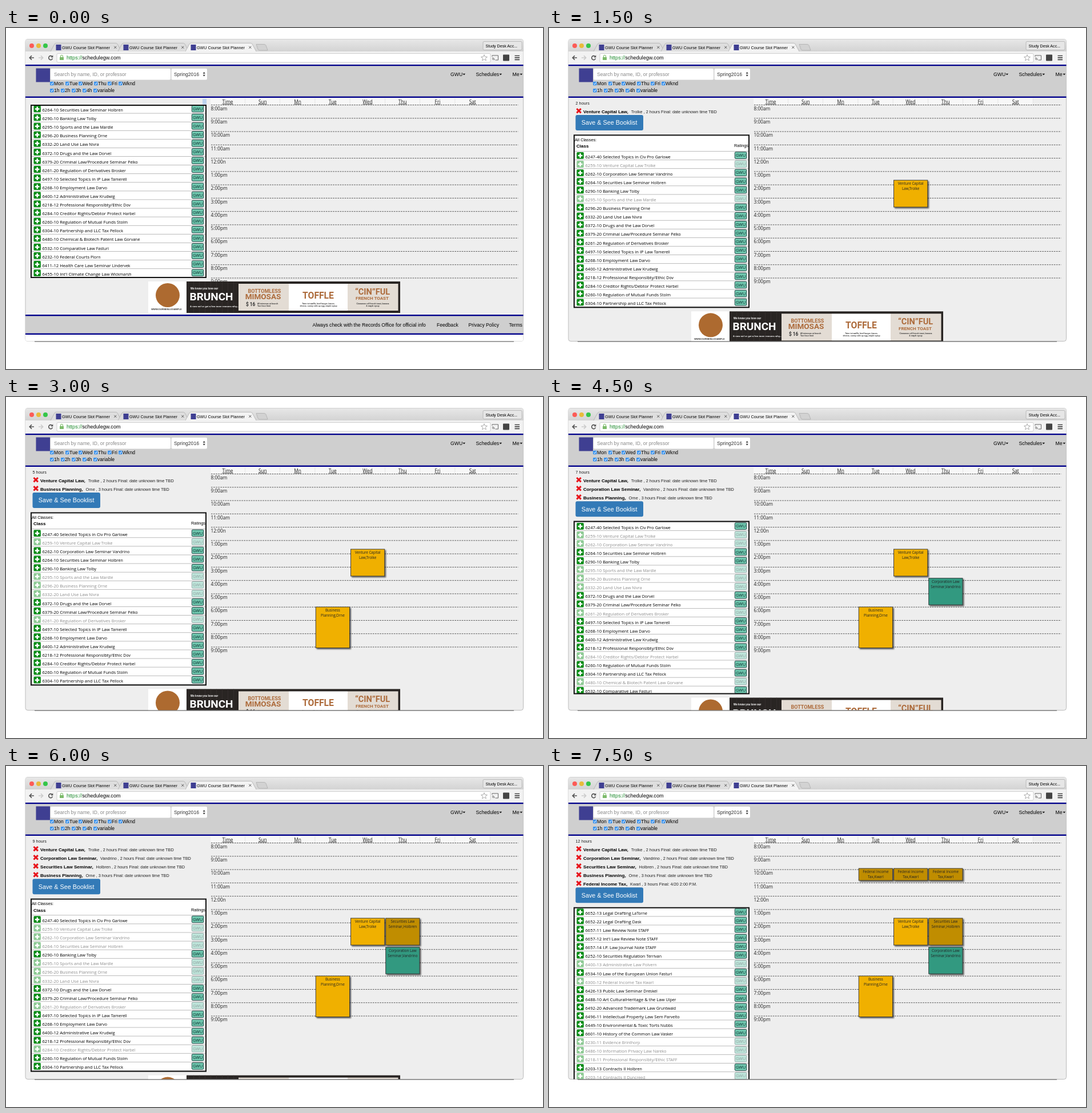
Write an HTML page that moves like this. It is 940 px wide and 596 px high and loops after 8 s.

```html
<!DOCTYPE html>
<html lang="en">
<head>
<meta charset="utf-8">
<title>Class planner</title>
<style>
html, body { margin: 0; width: 100%; height: 100%; overflow: hidden; background: #fff; }
svg { display: block; width: 940px; height: 596px; font-family: "Liberation Sans", Arial, sans-serif; }
.o { font-family: "Open Sans", "Noto Sans", sans-serif; }
.r { font-family: Roboto, sans-serif; font-weight: 700; }
text { white-space: pre; }
</style>
</head>
<body>
<svg id="stage" viewBox="0 0 940 596"></svg>
<script>
const PITCH = 15.09, NAVY = '#00008b';

const rect = (x, y, w, h, fill, more = '') =>
  `<rect x="${x}" y="${y}" width="${w}" height="${h}" fill="${fill}" ${more}/>`;
const text = (x, y, size, str, more = '') =>
  `<text x="${x}" y="${y}" font-size="${size}" ${more}>${str}</text>`;
const middle = (x, y, size, str, more = '') => text(x, y, size, str, `text-anchor="middle" ${more}`);
const path = (d, stroke, width = 1, more = '') =>
  `<path d="${d}" fill="none" stroke="${stroke}" stroke-width="${width}" ${more}/>`;
const shape = (d, fill) => `<path d="${d}" fill="${fill}"/>`;
const range = (n, draw) => Array.from({ length: n }, (_, i) => draw(i)).join('');
const parse = list => list.trim().split('\n').map(line => line.split('|'));

const classes = parse(`
6247-40 Selected Topics in Civ Pro|Garlowe
6259-10 Venture Capital Law|Trolke
6262-10 Corporation Law Seminar|Vandrino
6264-10 Securities Law Seminar|Holbren
6290-10 Banking Law|Tolby
6295-10 Sports and the Law|Mardle
6296-20 Business Planning|Orne
6332-20 Land Use Law|Nivra
6372-10 Drugs and the Law|Dorvel
6379-20 Criminal Law/Procedure Seminar|Pelko
6261-20 Regulation of Derivatives|Brosker
6497-10 Selected Topics in IP Law|Tamerell
6268-10 Employment Law|Darvo
6400-12 Administrative Law|Krudwig
6218-12 Professional Responslbty/Ethic|Dov
6284-10 Creditor Rights/Debtor Protect|Harbel
6260-10 Regulation of Mutual Funds|Stolm
6304-10 Partnership and LLC Tax|Pellock
6480-10 Chemical &amp; Biotech Patent Law|Gorvane
6532-10 Comparative Law|Fasturi
6232-10 Federal Courts|Plorn
6411-12 Health Care Law Seminar|Lindervek
6455-10 Int'l Climate Change Law|Wickmarsh`);

const laterClasses = parse(`
6652-13 Legal Drafting|LaTorne
6652-22 Legal Drafting|Dask
6657-11 Law Review Note|STAFF
6657-12 Int'l Law Review Note|STAFF
6657-14 I.P. Law Journal Note|STAFF
6252-10 Securities Regulation|Terrivan
6400-13 Administrative Law|Polvern
6534-10 Law of the European Union|Fasturi
6300-12 Federal Income Tax|Kwarl
6426-13 Public Law Seminar|Dreskel
6488-10 Art CulturalHeritage &amp; the Law|Ulper
6492-20 Advanced Trademark Law|Gruntwald
6496-11 Intellectual Property Law Sem|Parvelto
6449-10 Environmental &amp; Toxic Torts|Nubbs
6601-10 History of the Common Law|Vasker
6230-11 Evidence|Brinthorp
6486-10 Information Privacy Law|Nareko
6218-11 Professional Responslbty/Ethic|STAFF
6203-13 Contracts II|Holbren
6203-14 Contracts II|Duncreed`);

const TBD = 'date unknown time TBD';
// days: column numbers, Sunday = 0
const courses = {
  venture: { title: 'Venture Capital Law', who: 'Trolke', hours: 2, final: TBD,
    lines: ['Venture Capital', 'Law,Trolke'], days: [3], y: 266, h: 47, fill: '#f0b000' },
  corporation: { title: 'Corporation Law Seminar', who: 'Vandrino', hours: 2, final: TBD,
    lines: ['Corporation Law', 'Seminar,Vandrino'], days: [4], y: 316.7, h: 46.5, fill: '#339980' },
  securities: { title: 'Securities Law Seminar', who: 'Holbren', hours: 2, final: TBD,
    lines: ['Securities Law', 'Seminar,Holbren'], days: [4], y: 266, h: 47, fill: '#c08d00' },
  business: { title: 'Business Planning', who: 'Orne', hours: 3, final: TBD,
    lines: ['Business', 'Planning,Orne'], days: [2], y: 367, h: 71.5, fill: '#f0b000' },
  tax: { title: 'Federal Income Tax', who: 'Kwarl', hours: 3, final: '4/20 2:00 P.M.',
    lines: ['Federal Income', 'Tax,Kwarl'], days: [2, 3, 4], y: 179, h: 21, fill: '#c08d00' },
};

// top: list box, first: centre of the first row, off: rows that clash
const states = [
  { top: 134, first: 96.2, off: [], chosen: [] },
  { top: 186.3, first: 223, off: [1, 5], chosen: ['venture'] },
  { top: 201.4, first: 238.2, off: [1, 5, 6, 7, 10], chosen: ['venture', 'business'] },
  { top: 216.5, first: 226, off: [1, 2, 5, 6, 7, 10, 15, 18], chosen: ['venture', 'corporation', 'business'] },
  { top: 231.6, first: 268.3, off: [1, 2, 3, 5, 6, 7, 10, 15],
    chosen: ['venture', 'corporation', 'securities', 'business'] },
  { top: 246.7, first: 255.3, off: [6, 8, 15, 16, 17, 19], rows: laterClasses,
    chosen: ['venture', 'corporation', 'securities', 'business', 'tax'] },
];

function tab(i) {
  const x = 81 + i * 118, active = i === 2;
  return `<path d="M${x - 3} 41 L${x + 4} 28 Q${x + 5} 26.5 ${x + 7} 26.5 H${x + 111} Q${x + 113} 26.5 ${x + 114} 28 L${x + 121} 41"
    fill="${active ? '#f3f3f3' : '#dedede'}" stroke="#aaa" stroke-width=".7"/>` +
    rect(x + 6.5, 29, 9, 10, '#3f3f92') +
    text(x + 17, 36.8, 7.2, 'GWU Course Slot Planner') +
    path(`M${x + 108.3} 31.8 l4 4 m0 -4 l-4 4`, '#555', 1);
}

function browser() {
  const lights = ['#fc5b57', '#e8bb3a', '#35c649'];
  return rect(34, 19, 872, 23, 'url(#bar)') +
    lights.map((c, i) => `<circle cx="${45 + i * 12}" cy="31" r="4" fill="${c}"/>`).join('') +
    range(3, tab) +
    `<path d="M438 28.5 h14 q2 0 3 2 l3 8.5 h-14 q-2 0 -3 -2z" fill="#d2d2d2" stroke="#aaa" stroke-width=".7"/>` +
    rect(835, 23.5, 68, 15, '#e6e6e6', 'rx="2" stroke="#aaa" stroke-width=".7"') +
    text(839.5, 33.7, 7.1, 'Study Desk Acc...') +
    rect(34, 41, 872, 23, '#f2f2f2') +
    path('M49 52 H41.5 M45 48.3 L41.3 52 L45 55.7', '#555', 1.7) +
    path('M57 52 H64.5 M61 48.3 L64.7 52 L61 55.7', '#ccc', 1.7) +
    path('M81 50 A3.5 3.5 0 1 0 81.5 53.3', '#555', 1.6) + shape('M82.3 47.5 v4 h-4z', '#555') +
    rect(89, 44.5, 759, 15.5, '#fff', 'rx="2" stroke="#c4c4c4" stroke-width=".8"') +
    rect(94, 51, 7, 5, '#7dbb6b') + path('M95.5 51 v-1.5 a2 2 0 0 1 4 0 V51', '#7dbb6b', 1.1) +
    text(106, 55.2, 9.1, '<tspan fill="#1c8a2c">https://</tspan>schedulegw.com') +
    path('M837 46.7 l1.5 3.6 3.9 .3 -3 2.5 1 3.8 -3.4 -2.1 -3.4 2.1 1 -3.8 -3 -2.5 3.9 -.3z', '#999', .8) +
    path('M851 50 v-2 h10.5 v8 h-5 M851 52 q4 0 4 4 M851 54 q2 0 2 2', '#666', 1) +
    rect(870, 46.5, 11, 11, '#444', 'rx="1"') +
    path('M890.5 48.5 h8.5 m0 3.4 h-8.5 m0 3.4 h8.5', '#444', 1.7);
}

function checks(y, items) {
  return items.map(([x, label]) =>
    rect(x, y - 6.3, 6.6, 6.6, '#3b93ee', 'rx="1.2"') +
    path(`M${x + 1.5} ${y - 2.8} l1.5 1.6 2.3 -3.6`, '#fff', 1) +
    text(x + 7, y, 8.6, label)).join('');
}

function siteHeader() {
  const nav = [[778, 'GWU', 799.5], [822.5, 'Schedules', 863.5], [886.5, 'Me', 899.5]];
  return rect(34, 64, 872, 58, '#cfcfcf') +
    rect(34, 64, 872, 2.3, NAVY) + rect(34, 119.6, 872, 2.4, NAVY) +
    rect(52.5, 70.5, 24.5, 24, '#3f3f92') +
    rect(78, 71, 210, 19.5, '#fff', 'rx="2"') +
    text(84, 83.7, 8.6, 'Search by name, ID, or professor', 'fill="#888"') +
    rect(289.5, 71, 62.5, 19.5, '#fff', 'rx="2"') + text(294, 83.7, 8.6, 'Spring2016', 'fill="#333"') +
    shape('M344.7 79.7 l2 -3 2 3z M344.7 81.7 l2 3 2 -3z', '#333') +
    checks(100, [[77, 'Mon'], [104, 'Tue'], [127, 'Wed'], [154, 'Thu'], [178, 'Fri'], [197, 'Wknd']]) +
    checks(112.2, [[77, '1h'], [96, '2h'], [115, '3h'], [134, '4h'], [153, 'variable']]) +
    nav.map(([x, label, arrow]) => text(x, 83.7, 8.7, label) +
      shape(`M${arrow} 79.8 h4.6 l-2.3 2.6z`, '#111')).join('');
}

function timetable() {
  const days = ['Time', 'Sun', 'Mn', 'Tue', 'Wed', 'Thu', 'Fri', 'Sat'];
  const hour = i => i === 4 ? '12:00n' : `${(i + 7) % 12 + 1}:00${i < 4 ? 'am' : 'pm'}`;
  return rect(358, 123, 489, 11, '#f7f7f7') +
    days.map((day, i) => middle(388 + i * 61.25, 131.6, 8.3, day, 'class="o" fill="#222" text-decoration="underline"') +
      rect(418 + i * 61.25, 123, .7, 11, '#ddd')).join('') +
    range(14, i => {
      const y = 134.5 + i * 23.27;
      return path(`M359 ${y} H896.5`, '#444', .9, 'stroke-dasharray="2.6 1.5"') +
        text(358.5, y + 9.2, 8.3, hour(i), 'class="o" fill="#222"');
    });
}

function meetings({ lines, days, y, h, fill }) {
  return days.map(day => {
    const x = 419.7 + day * 61.25;
    return rect(x, y, 59.3, h, fill, 'stroke="#333" stroke-width=".9" filter="url(#drop)"') +
      lines.map((line, i) => middle(x + 29.7, y + 8.3 + i * 9, 6.3, line, 'class="o" fill="#222"')).join('');
  }).join('');
}

function selection(chosen) {
  if (!chosen.length) return rect(344, 124, 7, 9.5, '#bcd3ee');
  const picks = chosen.map(key => courses[key]);
  const total = picks.reduce((sum, pick) => sum + pick.hours, 0);
  const buttonY = 136.9 + picks.length * PITCH;
  return text(46.5, 133.7, 7.3, `${total} hours`, 'fill="#222"') +
    picks.map(({ title, who, hours, final }, i) => {
      const y = 144.6 + i * PITCH;
      return path(`M48.5 ${y - 3.6} l7.4 7.4 m0 -7.4 l-7.4 7.4`, '#e8141c', 3) +
        text(60, y + 4.2, 8.1, `<tspan font-weight="700">${title},</tspan>` +
          `<tspan dx="4.8" font-size="7.3" fill="#222">${who} , ${hours} hours Final: ${final}</tspan>`);
    }).join('') +
    rect(46.5, buttonY, 118.5, 27, '#337ab7', 'rx="3"') +
    text(56.7, buttonY + 17.4, 10.8, 'Save &amp; See Booklist', 'fill="#fff"');
}

function classRow([title, who], y, off) {
  return `<g opacity="${off ? .45 : 1}">` +
    rect(48.5, y - 6, 12.3, 11.8, '#058a14', 'rx="1.5"') +
    path(`M50.8 ${y} h7.8 M54.7 ${y - 3.9} v7.8`, '#fff', 2.5) +
    text(63.5, y + 4.6, 7.65, `${title} <tspan font-size="7">${who}</tspan>`, 'class="o"') +
    rect(325.3, y - 6.2, 20.6, 11.6, '#70c9b0', 'rx="1.5" stroke="#244" stroke-width="1"') +
    middle(335.6, y + 2.3, 7.2, 'GWU', 'class="o" fill="#022"') + '</g>' +
    rect(45, y + 7.2, 304, .8, '#aaa');
}

function classList({ top, first, off, rows = classes }) {
  return `<clipPath id="list"><rect x="44" y="${top}" width="306" height="302"/></clipPath>` +
    rect(44, top, 306, 302, '#fff') + '<g clip-path="url(#list)">' +
    text(45, first - 25.4, 7.3, 'All Classes:') +
    text(48, first - 13.8, 8.1, 'Class', 'font-weight="700"') +
    text(324, first - 14.8, 7.4, 'Ratings') +
    rect(45, first - 7.9, 304, .8, '#aaa') +
    rows.map((row, i) => classRow(row, first + i * PITCH, off.includes(i))).join('') + '</g>' +
    rect(44, top + 1, 306, 301, 'none', 'stroke="#111" stroke-width="2"');
}

function banner(y) {
  const copper = 'class="r" fill="#ad6b3b"', tiny = 'fill="#333" font-weight="700"';
  return `<g transform="translate(0 ${y})">` +
    rect(249, 0, 67, 55, '#fff') + rect(316, 0, 374, 55, '#292523') +
    '<circle cx="283" cy="24" r="21" fill="#ad6a30"/>' +
    middle(281, 49.5, 4, 'WWW.OURMENU.EXAMPLE', tiny) +
    range(9, i => rect(318 + i * 10, 0, .6, 55, '#3b3532')) +
    text(323, 13.5, 4.6, 'We know you love our', 'fill="#fff" font-weight="700"') +
    text(321.5, 33, 19, 'BRUNCH', 'class="r" fill="#fff"') +
    text(322, 44.5, 4.2, '&amp; now we\'ve got a few more reasons why...', 'fill="#fff" font-weight="700"') +
    rect(407, 4, 88, 47, '#e3dcd4') + rect(495, 4, 103, 47, '#fff') + rect(598, 4, 88.5, 47, '#e3dcd4') +
    middle(452.5, 19.6, 9, 'BOTTOMLESS', copper) + middle(450, 31, 13.5, 'MIMOSAS', copper) +
    text(420, 43, 8.3, '$ 16', 'class="r" fill="#333"') +
    text(440, 39.5, 3.4, 'All mimosas at brunch', tiny) + text(440, 43.5, 3.4, 'Two hour limit', tiny) +
    middle(546.5, 29.8, 15.7, 'TOFFLE', copper) +
    middle(547, 40, 3.4, 'Tater tot waffle, beef burger, bacon,', tiny) +
    middle(547, 44, 3.4, 'cheese, sunny side up egg, maple syrup', tiny) +
    middle(641.5, 23, 14.5, '“CIN”FUL', copper) + middle(641, 32.3, 8, 'FRENCH TOAST', copper) +
    middle(642, 40, 3.4, 'Cinnamon roll french toast, banana', tiny) +
    middle(642, 44, 3.4, '&amp; maple syrup', tiny) + '</g>';
}

function footer() {
  const items = [[536.5, 'Always check with the Records Office for official info'],
    [754, 'Feedback'], [809.5, 'Privacy Policy'], [880.5, 'Terms']];
  return rect(34, 501, 872, 35, '#cfcfcf') + rect(34, 501, 872, 2.4, NAVY) +
    rect(34, 533.6, 872, 2.4, NAVY) + rect(34, 536, 872, 12, '#fff') +
    items.map(([x, label]) => text(x, 521.8, 8.6, label)).join('');
}

const defs = `<defs>
  <linearGradient id="bar" x2="0" y2="1"><stop stop-color="#e8e8e8"/><stop offset="1" stop-color="#d2d2d2"/></linearGradient>
  <filter id="drop" x="-20%" y="-40%" width="150%" height="200%"><feDropShadow dx="2" dy="2" stdDeviation="1.2" flood-opacity=".6"/></filter>
  <clipPath id="window"><rect x="34" y="19.5" width="871.5" height="528" rx="4"/></clipPath></defs>`;

function scene(state) {
  return defs + rect(34, 19.5, 871.5, 528, '#eee', 'rx="4" stroke="#bbb" stroke-width="1"') +
    '<g clip-path="url(#window)">' + browser() + siteHeader() + timetable() +
    state.chosen.map(key => meetings(courses[key])).join('') +
    selection(state.chosen) + classList(state) + banner(state.top + 309) +
    (state.chosen.length ? '' : footer()) + '</g>' +
    rect(50, 547.5, 839, 1, '#555');
}

const stage = document.getElementById('stage');
let shown = -1;
function tick() {
  const index = Math.floor(performance.now() % 8000 / 1500);
  if (index !== shown) {
    shown = index;
    stage.innerHTML = scene(states[index]);
  }
  requestAnimationFrame(tick);
}
tick();
</script>
</body>
</html>
```
